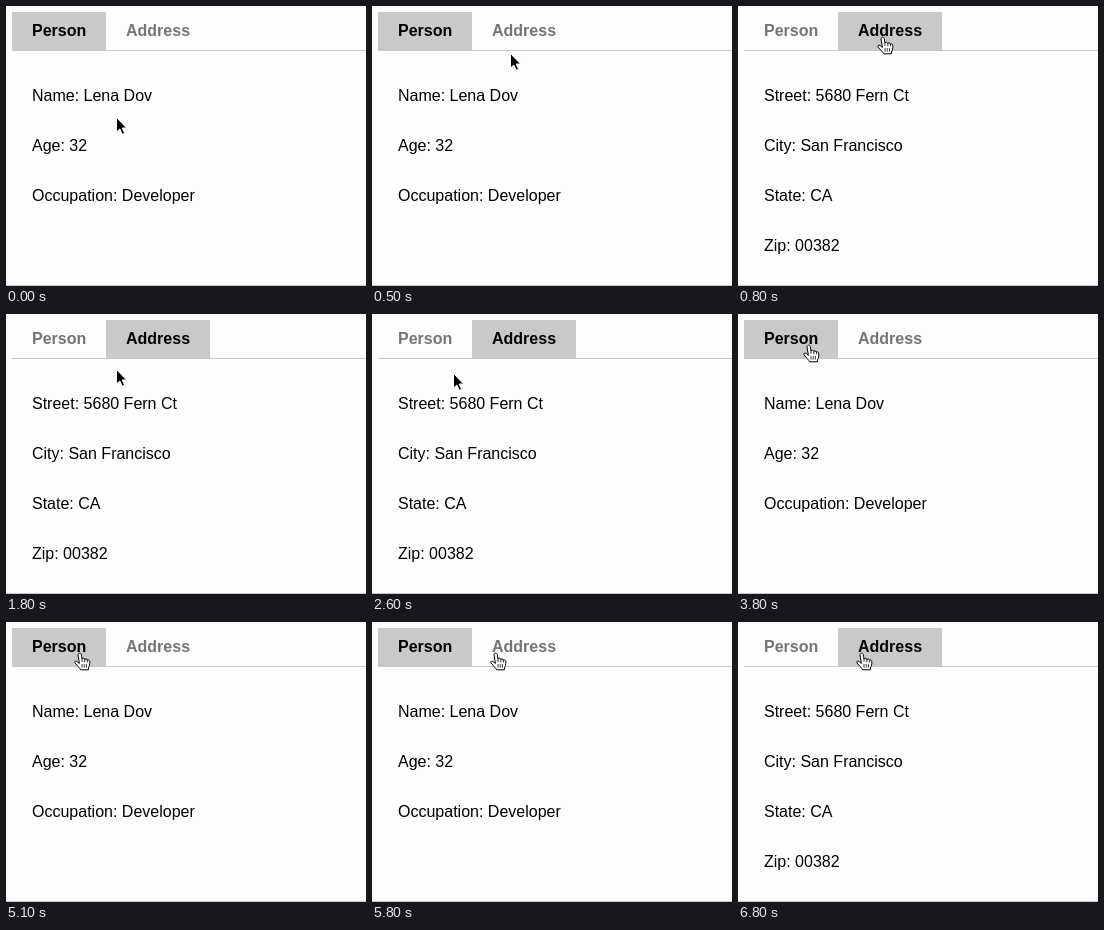
Write an HTML page that moves like this. It is 360x280 px and loops after 6900 ms.

```html
<!DOCTYPE html>
<html lang="en">
<head>
<meta charset="utf-8">
<title>Tabs</title>
<style>
  html, body { margin: 0; height: 100%; overflow: hidden; background: #fdfdfd; }
  svg { display: block; font: 16px "Liberation Sans", Arial, sans-serif; }
  .tab text { font-weight: bold; fill: #757575; }
  .tab rect { fill: none; }
  .tab.on text { fill: #000; }
  .tab.on rect { fill: #c9c9c9; }
</style>
</head>
<body>
<svg width="360" height="280">
  <path d="M6 44.5H360M0 279.5H360" stroke="#c9c9c9"/>
  <g class="tab"><rect x="6" y="6" width="94" height="39"/><text x="26" y="30">Person</text></g>
  <g class="tab"><rect x="100" y="6" width="104" height="39"/><text x="120" y="30">Address</text></g>
  <g class="panel">
    <text x="26" y="95">Name: Lena Dov</text>
    <text x="26" y="145">Age: 32</text>
    <text x="26" y="195">Occupation: Developer</text>
  </g>
  <g class="panel">
    <text x="26" y="95">Street: 5680 Fern Ct</text>
    <text x="26" y="145">City: San Francisco</text>
    <text x="26" y="195">State: CA</text>
    <text x="26" y="245">Zip: 00382</text>
  </g>
  <g id="cursor">
    <path id="arrow" d="M.5 .5V15L3.8 12L6.2 17.3L8.6 16.2L6.2 11H10.6Z" stroke="#fff" stroke-linejoin="round"/>
    <g id="hand" fill="#fff" stroke="#000" stroke-linejoin="round" stroke-linecap="round">
      <path d="M-2 1.6C-2-.4 1-.4 1.3 1.5L2 6C2.5 4.8 4.5 5 4.8 6.5C5.4 5.5 7.2 5.8 7.4 7.2C8.3 6.5 9.8 7 9.8 8.7C10 11.5 9.4 13 8.4 15V16.8H.6C0 15-2.6 13-5 10C-5.8 8.3-4 7.5-2.7 8.7L-.9 10.2Z"/>
      <path d="M2 6V8.5M4.8 6.5V8.8M7.4 7.2V9M2 11.5V14.2M4.2 11.5V14.2M6.4 11.5V14.2" stroke-width=".8"/>
    </g>
  </g>
</svg>
<script>
const LOOP = 6900, STEP = 100;
// time, x, y of the pointer's hot spot
const path = [
  [0, 110, 111], [700, 145, 31], [1300, 145, 31], [1800, 110, 55],
  [2600, 81, 59], [3000, 76, 64], [3200, 76, 64], [3700, 71, 31],
  [5000, 71, 31], [5700, 124, 31], [LOOP, 124, 31]
];
// time of each click and the tab it opens
const clicks = [[0, 0], [800, 1], [3800, 0], [5900, 1]];
const $ = id => document.getElementById(id);
const tabs = document.querySelectorAll('.tab');
const panels = document.querySelectorAll('.panel');
const show = (el, on) => el.setAttribute('visibility', on ? 'visible' : 'hidden');
const ease = u => u * u * (3 - 2 * u);

function pointer(t) {
  const i = path.findIndex(p => p[0] > t);
  const [t0, x0, y0] = path[i - 1], [t1, x1, y1] = path[i];
  const u = ease((t - t0) / (t1 - t0));
  return [x0 + (x1 - x0) * u, y0 + (y1 - y0) * u];
}

function draw(now) {
  const t = Math.floor(now % LOOP / STEP) * STEP;
  const open = clicks.filter(c => c[0] <= t).pop()[1];
  tabs.forEach((tab, i) => tab.classList.toggle('on', i === open));
  panels.forEach((panel, i) => show(panel, i === open));
  const [x, y] = pointer(t).map(Math.round);
  $('cursor').setAttribute('transform', `translate(${x} ${y})`);
  show($('hand'), y < 45);
  show($('arrow'), y >= 45);
}

const start = performance.now();
function frame() {
  draw(performance.now() - start);
  requestAnimationFrame(frame);
}
frame();
</script>
</body>
</html>
```
